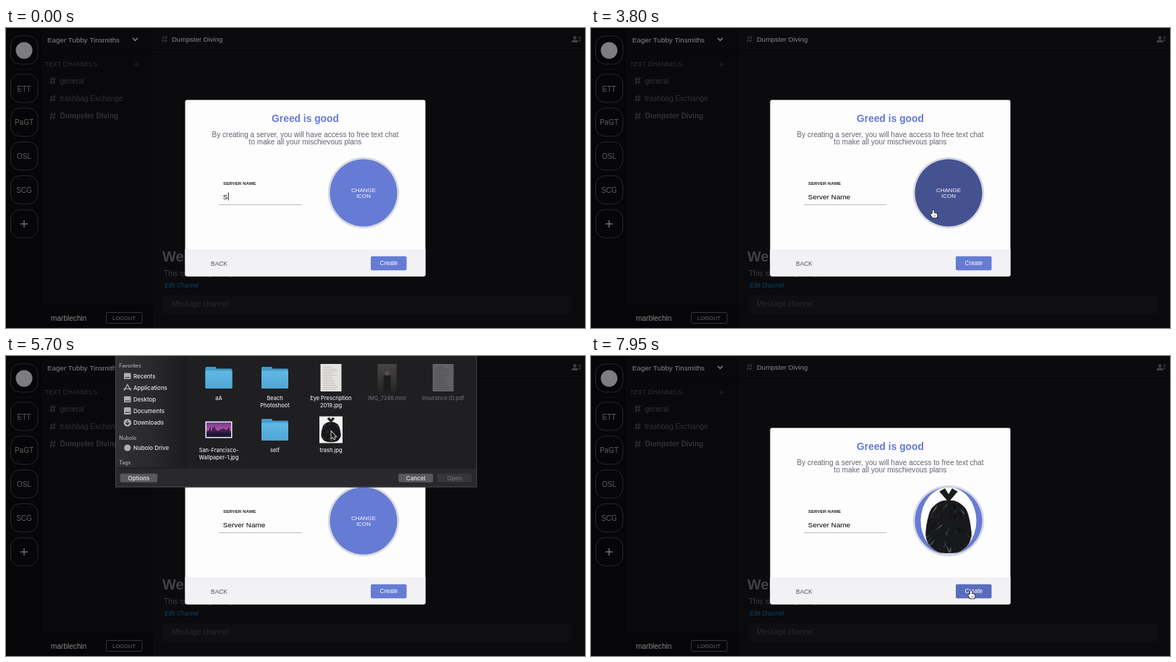
An HTML page with a canvas for the animation above (8000 ms loop, 800 by 415 pixels).

```html
<!DOCTYPE html>
<html lang="en">
<head>
<meta charset="utf-8">
<title>Create a server</title>
<style>
html, body { margin: 0; width: 100%; height: 100%; overflow: hidden; background: #0b0b0e; }
canvas { display: block; width: 800px; height: 415px; }
</style>
</head>
<body>
<canvas id="stage"></canvas>
<script>
const W = 800, H = 415, LOOP = 8000, STEP = 50;
const canvas = document.getElementById('stage');
const c = canvas.getContext('2d');
const dpr = window.devicePixelRatio || 1;
canvas.width = W * dpr;
canvas.height = H * dpr;

const SANS = '"Liberation Sans", Arial, sans-serif';
const UI = 'Inter, Roboto, sans-serif';
const BLUE = '#667bd4';

// Moments of the story, in ms
const KEY_TIME = 180, TYPED = 1800, PICK = 4350, SELECT = 6100, ICON_SET = 7100;
const OPEN_AT = 4450, CLOSE_AT = 6600, SLIDE = 333, SHEET_H = 181.5;

const gray = v => `rgb(${v},${v},${v + 2})`;
function smooth(t, start, length) {
  const p = Math.min(1, Math.max(0, (t - start) / length));
  return p * p * (3 - 2 * p);
}
function seeded(seed) {
  return () => (seed = (seed * 16807) % 2147483647) / 2147483647;
}

// Drawing helpers
function text(str, x, y, size, color, { weight = 400, align = 'left', font = SANS } = {}) {
  c.font = `${weight} ${size}px ${font}`;
  c.fillStyle = color;
  c.textAlign = align;
  c.fillText(str, x, y);
}
const centered = (str, x, y, size, color, opts) => text(str, x, y, size, color, { align: 'center', ...opts });
const uiText = (str, x, y, size, color, opts) => text(str, x, y, size, color, { weight: 500, font: UI, ...opts });

function rect(x, y, w, h, color) {
  c.fillStyle = color;
  c.fillRect(x, y, w, h);
}
function round(x, y, w, h, r, fill, stroke) {
  c.beginPath();
  c.roundRect(x, y, w, h, r);
  if (fill) { c.fillStyle = fill; c.fill(); }
  if (stroke) { c.strokeStyle = stroke; c.lineWidth = 1; c.stroke(); }
}
function disc(x, y, r, color) {
  c.beginPath();
  c.arc(x, y, r, 0, Math.PI * 2);
  c.fillStyle = color;
  c.fill();
}
function path(points) {
  c.beginPath();
  for (const [x, y] of points) c.lineTo(x, y);
}
function line(color, width, ...points) {
  path(points);
  c.strokeStyle = color;
  c.lineWidth = width;
  c.stroke();
}
function poly(color, ...points) {
  path(points);
  c.fillStyle = color;
  c.fill();
}
function plus(x, y, r, color, width) {
  line(color, width, [x - r, y], [x + r, y]);
  line(color, width, [x, y - r], [x, y + r]);
}
function chevron(x, y, r, color, width) {
  line(color, width, [x - r, y - r / 2], [x, y + r / 2], [x + r, y - r / 2]);
}
function fade(x0, y0, x1, y1, ...colors) {
  const g = c.createLinearGradient(x0, y0, x1, y1);
  colors.forEach((color, i) => g.addColorStop(i / (colors.length - 1), color));
  return g;
}

// Page behind the modal
function hash(x, y, color) {
  for (const d of [-2, 2]) {
    line(color, 1, [x + d + 1, y - 5], [x + d - 1, y + 5]);
    line(color, 1, [x - 4, y + d], [x + 4, y + d]);
  }
}

function drawPage() {
  rect(0, 0, W, H, '#0b0b0e');
  rect(0, 0, 49, H, '#060608');
  rect(49, 0, 154, H, '#09090b');
  rect(49, 383, 154, 32, '#060608');
  rect(49, 30, W - 49, 1, '#050506');

  disc(25, 31, 11.5, gray(125));
  rect(13, 57, 24, 1, gray(16));
  ['', 'ETT', 'PaGT', 'OSL', 'SCG', ''].forEach((name, i) => {
    const y = i ? 36.7 + i * 46.8 : 30.5;
    round(6.5, y - 19.5, 37.5, 39, 13, null, gray(40));
    centered(name, 25, y + 4, 10, gray(95));
  });
  plus(25, 271, 5, gray(105), 1.6);

  text('Eager Tubby Tinsmiths', 57, 19.5, 9.8, gray(135));
  chevron(178.5, 15.5, 3.5, gray(125), 1.6);
  hash(219, 15.5, gray(50));
  text('Dumpster Diving', 229, 19.3, 9.5, gray(135));

  disc(786, 13.5, 2.2, gray(65));
  round(781.5, 16.5, 9, 3.5, [3, 3, 0, 0], gray(65));
  for (let y = 12.5; y < 18; y += 2.5) line(gray(65), 1, [791, y], [794, y]);

  text('TEXT CHANNELS', 54, 53, 8.7, gray(48));
  plus(180, 50, 3.5, gray(38), 1);
  ['general', 'trashbag Exchange', 'Dumpster Diving'].forEach((name, i) => {
    const y = 73 + i * 24.4;
    hash(64.5, y, gray(52));
    text(name, 74.5, y + 3.6, 10.1, gray(50), { weight: i === 2 ? 700 : 400 });
  });

  text('marblechin', 62, 404.5, 10.1, gray(135));
  round(138.5, 393.5, 49.5, 15, 2, null, gray(55));
  centered('LOGOUT', 163, 403.7, 7.6, gray(105));

  text('Welcome to Dumpster Diving', 216, 323, 20, gray(65), { weight: 700 });
  text('This is the beginning of this channel.', 218, 342.8, 10.4, gray(60));
  text('Edit Channel', 219.5, 359, 8.2, '#0a4263');
  round(217, 369.5, 565, 26, 4, '#0f0f12');
  text('Message channel', 229, 385, 10, gray(42));
}

// Rubbish bag centred on x, y: tied corners, a squarish belly and random folds
function drawBag(x, y, w, h) {
  c.save();
  c.translate(x, y);
  c.scale(w, h);
  for (const side of [-1, 1])
    poly('#1b1c1e', [0, -0.28], [side * 0.18, -0.44], [side * 0.07, -0.49], [0, -0.4]);

  const bulge = v => Math.sign(v) * Math.abs(v) ** 0.8;
  const belly = Array.from({ length: 48 }, (_, i) => {
    const a = i / 48 * Math.PI * 2, s = Math.sin(a);
    const width = (0.44 + 0.06 * s) * (1 + 0.02 * Math.sin(a * 7));
    return [bulge(Math.cos(a)) * width, 0.09 + bulge(s) * 0.4];
  });
  poly('#18191b', ...belly);
  c.clip();

  const rnd = seeded(77);
  for (let i = 0; i < 46; i++) {
    const a = rnd() * Math.PI * 2, r = Math.sqrt(rnd()) * 0.45;
    const fx = Math.cos(a) * r, fy = 0.1 + Math.sin(a) * r;
    const len = 0.06 + rnd() * 0.13, lean = fx * 0.6 + (rnd() - 0.5) * 0.2;
    poly(gray(12 + Math.floor(rnd() ** 2 * 85)), [fx, fy], [fx + lean, fy + len], [fx + lean * 0.4 + 0.035, fy + len * 0.4]);
  }
  c.restore();
}

const ICON = { x: 494, y: 228, r: 46.5 };
const BUTTON = { x: 504, y: 315.8, w: 49.5, h: 19.5 };
const overIcon = p => Math.hypot(p.x - ICON.x, p.y - ICON.y) < ICON.r;
const overButton = p => p.x > BUTTON.x && p.x < BUTTON.x + BUTTON.w && p.y > BUTTON.y && p.y < BUTTON.y + BUTTON.h;

function drawIcon(t, mouse) {
  const { x, y, r } = ICON;
  disc(x, y, r + 2.8, '#d9dbe0');
  if (t < ICON_SET) {
    disc(x, y, r, t < 4900 && overIcon(mouse) ? '#455290' : BLUE);
    centered('CHANGE', x, y - 1.4, 8, '#f8f9fd');
    centered('ICON', x, y + 7, 8, '#f8f9fd');
    return;
  }
  disc(x, y, r, BLUE);
  c.save();
  c.beginPath();
  c.ellipse(x, y, 38.5, r, 0, 0, Math.PI * 2);
  c.clip();
  rect(x - r, y - r, r * 2, r * 2, '#fdfdfe');
  drawBag(x, y, 70, 92);
  c.restore();
}

function drawModal(t, mouse) {
  round(247.5, 99.5, 332, 244, 2.5, '#fdfdfe');
  round(247.5, 306, 332, 37.5, [0, 0, 2.5, 2.5], '#f2f2f4');
  centered('Greed is good', 413.5, 130.4, 13.8, BLUE, { weight: 700 });
  ['By creating a server, you will have access to free text chat', 'to make all your mischievous plans']
    .forEach((row, i) => centered(row, 413.5, 150.5 + i * 10, 10.06, '#62656d'));

  text('SERVER NAME', 300, 216.6, 6.2, '#202227', { weight: 700 });
  const typed = 'Server Name'.slice(0, 1 + Math.floor(t / KEY_TIME));
  text(typed, 299.8, 236.6, 9.95, '#000');
  const caretX = 300.3 + c.measureText(typed).width;
  const blink = Math.floor((t - TYPED) / 530) % 2 === 0;
  if (t < TYPED || (t < PICK && blink)) rect(caretX, 227.5, 1, 11, '#303034');
  rect(294, 244, 114.5, 1, '#b9bbc1');

  drawIcon(t, mouse);

  text('BACK', 283, 329, 8.45, '#54575f');
  round(BUTTON.x, BUTTON.y, BUTTON.w, BUTTON.h, 2, overButton(mouse) ? '#5a6dbc' : BLUE);
  centered('Create', 528.8, 328.4, 8.2, '#fff');
}

// File chooser sheet
function drawFolder(x, y) {
  round(x - 18.5, y - 15, 15, 8, 1.5, '#459bcb');
  round(x - 18.5, y - 12.5, 37, 27, 1.5, '#459bcb');
  round(x - 18.5, y - 9.5, 37, 24.5, 1.5, fade(0, y - 9, 0, y + 15, '#62b8e4', '#4ea6d6'));
}

function drawPaper(x, y, paper, ink) {
  const rnd = seeded(5);
  rect(x - 14.5, y - 19, 29, 38, paper);
  for (let row = -15; row < 16; row += 2.8) rect(x - 11, y + row, 12 + rnd() * 10, 0.7, ink);
}

function drawMovie(x, y) {
  rect(x - 13, y - 19, 26, 38, fade(0, y - 19, 0, y + 19, '#474445', '#272627'));
  round(x - 5, y - 4, 10, 23, [4, 4, 0, 0], '#1c1b1d');
  disc(x, y - 6, 3, '#56504d');
}

function drawWallpaper(x, y) {
  const rnd = seeded(9);
  rect(x - 18.5, y - 11.5, 37, 23, '#efeef2');
  rect(x - 17, y - 10, 34, 20, fade(0, y - 10, 0, y + 10, '#6d3b92', '#b5509f', '#1c1634'));
  for (let i = 0; i < 17; i++) {
    const h = 2 + rnd() * 6;
    rect(x - 17 + i * 2, y + 4 - h, 1.7, h, '#2b1c46');
  }
  rect(x - 17, y + 4, 34, 6, '#1d1636');
}

function drawPlaces() {
  rect(152, -80, 95.5, 235, fade(152, 0, 247, 0, gray(48), gray(42), gray(29)));
  rect(247.5, -80, 1, 235, '#161617');

  const ink = gray(175), back = gray(42);
  const heading = (str, y) => uiText(str, 156.3, y, 6.9, gray(160), { weight: 600 });
  const place = (str, y) => uiText(str, 176, y + 3, 7.9, gray(230));

  heading('Favorites', 16.3);
  ['Recents', 'Applications', 'Desktop', 'Documents', 'Downloads'].forEach((name, i) => {
    const y = 27.8 + i * 16.1;
    place(name, y);
    if (name === 'Applications') {
      line(ink, 1.3, [163.3, y + 4], [167.8, y - 4.5], [172.3, y + 4]);
      line(ink, 1.3, [162.3, y + 1.5], [173.3, y + 1.5]);
    } else if (name === 'Downloads') {
      disc(167.8, y, 5.3, ink);
      line(back, 1.2, [167.8, y - 3], [167.8, y + 2]);
      chevron(167.8, y + 1.3, 2.6, back, 1.2);
    } else {
      const tall = name === 'Documents' ? 10 : 8.5;
      round(163, y - tall / 2, 9.6, tall, 1.3, ink);
      rect(164.5, y + 1.5, 6.6, 1, back);
    }
  });
  heading('Nubolo', 115.6);
  place('Nubolo Drive', 126.8);
  disc(167.8, 127, 4.6, ink);
  heading('Tags', 149.6);
}

const FILES = [
  { rows: ['aA'], draw: drawFolder },
  { rows: ['Beach', 'Photoshoot'], draw: drawFolder },
  { rows: ['Eye Prescription', '2019.jpg'], draw: (x, y) => drawPaper(x, y, '#e4e2df', '#b5b3b1') },
  { rows: ['IMG_7246.mov'], draw: drawMovie, dim: true },
  { rows: ['Insurance ID.pdf'], draw: (x, y) => drawPaper(x, y, '#626264', '#4c4c4e'), dim: true },
  { rows: ['San-Francisco-', 'Wallpaper-1.jpg'], draw: drawWallpaper },
  { rows: ['self'], draw: drawFolder },
  { rows: ['trash.jpg'], draw: drawTrash }
];

function drawTrash(x, y, selected) {
  if (selected) {
    round(x - 21, y - 22, 42, 44, 3, '#454547');
    round(x - 19, y + 24, 38, 10, 2, '#1558c8');
  }
  rect(x - 16, y - 18.5, 32, 37, '#f2f2f2');
  drawBag(x, y, 30, 35);
}

function drawFiles(selected) {
  FILES.forEach(({ rows, draw, dim }, i) => {
    const x = 294 + (i % 5) * 77.5, y = 30 + Math.floor(i / 5) * 72;
    draw(x, y, selected);
    rows.forEach((row, j) =>
      uiText(row, x, y + 31.2 + j * 9.8, 7.4, gray(dim ? 105 : 230), { align: 'center' }));
  });
}

function sheetButton(str, x, w, enabled = true) {
  round(x, 162.7, w, 12, 2, gray(enabled ? 89 : 55));
  uiText(str, x + w / 2, 171.6, 8, gray(enabled ? 235 : 110), { align: 'center' });
}

function drawSheet(t) {
  const open = smooth(t, OPEN_AT, SLIDE) * (1 - smooth(t, CLOSE_AT, SLIDE));
  if (!open) return;
  const selected = t >= SELECT;
  c.save();
  c.translate(0, (open - 1) * SHEET_H);
  rect(151, -80, 499.5, 80 + SHEET_H, '#1f1f21');
  drawPlaces();
  c.globalAlpha = 0.5 + 0.5 * smooth(t, OPEN_AT + 200, 200);
  drawFiles(selected);
  c.globalAlpha = 1;
  rect(151, 155, 499.5, SHEET_H - 155, '#29292b');
  rect(151, 154.5, 499.5, 1, '#18181a');
  sheetButton('Options', 157.7, 51.5);
  sheetButton('Cancel', 542.3, 47.7);
  sheetButton('Open', 596, 47.5, selected);
  c.strokeStyle = gray(68);
  c.lineWidth = 1;
  c.strokeRect(151.5, -80, 498.5, 79.5 + SHEET_H);
  c.restore();
}

// Pointer: each move eases from the last place to the next
const APPEAR = 2600;
const MOVES = [
  { at: APPEAR, time: 1100, x: 473, y: 252 },
  { at: 3850, time: 650, x: 469, y: 221 },
  { at: 5000, time: 600, x: 449.5, y: 104.5 },
  { at: 6400, time: 400, x: 454, y: 111.5 },
  { at: 7250, time: 650, x: 525, y: 325 }
];

function pointer(t) {
  let x = 330, y = 262;
  for (const m of MOVES) {
    const p = smooth(t, m.at, m.time);
    x += (m.x - x) * p;
    y += (m.y - y) * p;
  }
  return { x, y };
}

function drawHand() {
  const shape = new Path2D();
  shape.roundRect(-1.2, 0, 2.4, 8, 1.2);
  shape.roundRect(-2.2, 4.2, 7.6, 6.2, 2);
  shape.ellipse(-2.2, 6.6, 1.2, 1.8, -0.6, 0, Math.PI * 2);
  c.strokeStyle = '#16171c';
  c.lineWidth = 1.6;
  c.stroke(shape);
  c.fillStyle = '#fff';
  c.fill(shape);
  for (const x of [1.3, 3]) line('#55575f', 0.6, [x, 6.5], [x, 9]);
}

function drawArrow() {
  path([[0, 0], [0, 9.4], [2.1, 7.5], [3.6, 10.8], [5, 10.2], [3.6, 7], [6.4, 7]]);
  c.closePath();
  c.strokeStyle = '#f2f2f2';
  c.lineWidth = 1.6;
  c.stroke();
  c.fillStyle = '#0a0a0a';
  c.fill();
}

function drawPointer(t, mouse) {
  const sheetUp = t > OPEN_AT + SLIDE && t < ICON_SET;
  c.save();
  c.translate(mouse.x, mouse.y);
  if (!sheetUp && (overIcon(mouse) || overButton(mouse))) drawHand();
  else drawArrow();
  c.restore();
}

function draw(now) {
  const t = Math.floor((now % LOOP) / STEP) * STEP;
  const mouse = pointer(t);
  c.setTransform(dpr, 0, 0, dpr, 0, 0);
  drawPage();
  drawModal(t, mouse);
  drawSheet(t);
  if (t >= APPEAR) drawPointer(t, mouse);
}

let start;
function frame(now) {
  start ??= now;
  draw(now - start);
  requestAnimationFrame(frame);
}
requestAnimationFrame(frame);
</script>
</body>
</html>
```
